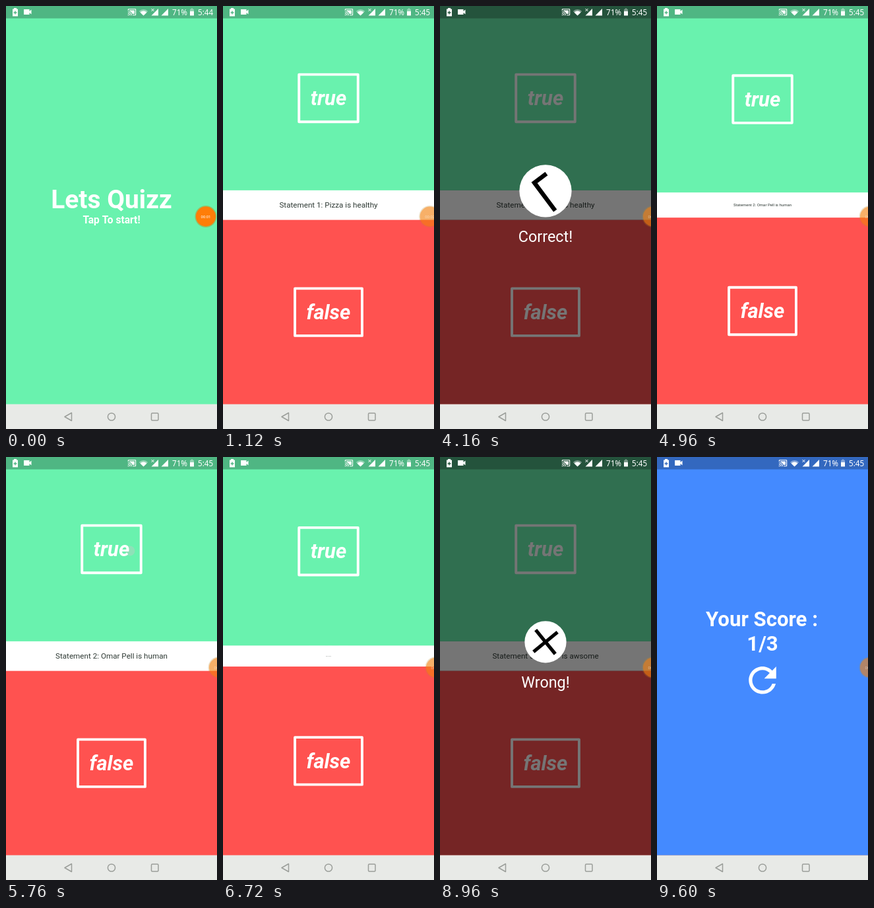
Animation, 320 px wide and 640 px high, one loop 9760 ms. Source, as an HTML page with a canvas:

```html
<!DOCTYPE html>
<html lang="en">
<head>
<meta charset="utf-8">
<title>Quiz</title>
<style>
html, body { margin: 0; width: 100%; height: 100%; overflow: hidden; }
canvas { display: block; width: 320px; height: 640px; }
</style>
</head>
<body>
<canvas id="stage" width="320" height="640"></canvas>
<script>
const ctx = document.getElementById('stage').getContext('2d');
const LOOP = 9760, W = 320, BODY = 602.6, MID = BODY / 2, DP = 320 / 411;
const GREEN = '#69f2ae', RED = '#ff5250', BLUE = '#448aff';
const QUIZ_START = 480, SCORE_START = 9190, PUSH = 300;

const questions = [
  { text: 'Statement 1: Pizza is healthy', start: QUIZ_START, tap: 3800, x: 192, y: 468, correct: true },
  { text: 'Statement 2: Omar Pell is human', start: 4830, tap: 5800, x: 188, y: 142, correct: false },
  { text: 'Statement 3: Flutter is awsome', start: 6680, tap: 7770, x: 192, y: 468, correct: false }
];

const icons = {
  clear: 'M19 6.41L17.59 5 12 10.59 6.41 5 5 6.41 10.59 12 5 17.59 6.41 19 12 13.41 17.59 19 19 17.59 13.41 12z',
  done: 'M9 16.2L4.8 12l-1.4 1.4L9 19 21 7l-1.4-1.4z',
  refresh: 'M17.65 6.35C16.2 4.9 14.21 4 12 4c-4.42 0-8 3.58-8 8s3.58 8 8 8c3.73 0 6.84-2.55 7.73-6h-2.08c-.82 2.33-3.04 4-5.65 4-3.31 0-6-2.69-6-6s2.69-6 6-6c1.66 0 3.14.69 4.22 1.78L13 11h7V4z',
  cast: 'M21 3H3c-1.1 0-2 .9-2 2v3h2V5h18v14h-7v2h7c1.1 0 2-.9 2-2V5c0-1.1-.9-2-2-2zM1 18v3h3c0-1.66-1.34-3-3-3zm0-4v2c2.76 0 5 2.24 5 5h2c0-3.87-3.13-7-7-7zm0-4v2c4.97 0 9 4.03 9 9h2c0-6.08-4.93-11-11-11zM19 7H5v1.63c3.96 1.28 7.09 4.41 8.37 8.37H19z'
};
for (const name in icons) icons[name] = new Path2D(icons[name]);

const clamp = v => Math.min(1, Math.max(0, v));

function bezier(x1, y1, x2, y2) {
  const at = (a, b, s) => 3 * a * s * (1 - s) ** 2 + 3 * b * s * s * (1 - s) + s ** 3;
  return x => {
    let lo = 0, hi = 1;
    for (let i = 0; i < 20; i++) {
      const s = (lo + hi) / 2;
      if (at(x1, x2, s) < x) lo = s; else hi = s;
    }
    return at(y1, y2, lo);
  };
}
const slideEase = bezier(.4, 0, .2, 1), fadeEase = bezier(.42, 0, 1, 1);

function bounceOut(t) {
  const hop = (shift, base) => 7.5625 * (t - shift / 2.75) ** 2 + base;
  if (t < 1 / 2.75) return hop(0, 0);
  if (t < 2 / 2.75) return hop(1.5, .75);
  if (t < 2.5 / 2.75) return hop(2.25, .9375);
  return hop(2.625, .984375);
}

const elasticOut = t =>
  t >= 1 ? 1 : 2 ** (-10 * t) * Math.sin((t - .1) * Math.PI * 5) + 1;

function rect(x, y, w, h, color) {
  ctx.fillStyle = color;
  ctx.fillRect(x, y, w, h);
}

function disc(x, y, r, color) {
  ctx.fillStyle = color;
  ctx.beginPath();
  ctx.arc(x, y, r, 0, 7);
  ctx.fill();
}

function poly(...p) {
  ctx.beginPath();
  for (let i = 0; i < p.length; i += 2) ctx.lineTo(p[i], p[i + 1]);
  ctx.closePath();
}

// Centres a line of text on (x, y) by its line box.
function label(text, x, y, size, color = '#fff', style = '') {
  ctx.font = `${style} ${size}px Roboto, sans-serif`;
  ctx.textAlign = 'center';
  ctx.fillStyle = color;
  ctx.fillText(text, x, y + size * .342);
}

function icon(name, x, y, size, color, angle = 0) {
  ctx.save();
  ctx.translate(x, y);
  ctx.rotate(angle);
  ctx.scale(size / 24, size / 24);
  ctx.translate(-12, -12);
  ctx.fillStyle = color;
  ctx.fill(icons[name]);
  ctx.restore();
}

function landing() {
  rect(0, 0, W, BODY, GREEN);
  label('Lets Quizz', 160, MID - 9.1, 50 * DP, '#fff', 'bold');
  label('Tap To start!', 160, MID + 22.8, 20 * DP, '#fff', 'bold');
}

function ripple(q, t, top, h) {
  const dt = t - q.tap;
  if (dt < -90 || dt > 200 || q.y < top || q.y > top + h) return;
  const r = dt < 0 ? (dt + 90) * .145 : 13 + dt * DP;
  ctx.save();
  ctx.beginPath();
  ctx.rect(0, top, W, h);
  ctx.clip();
  disc(q.x, q.y, r, `rgba(200,200,200,${.4 * (1 - Math.max(0, dt) / 200)})`);
  ctx.restore();
}

function answer(text, top, h, color, q, t) {
  rect(0, top, W, h, color);
  ripple(q, t, top, h);
  const size = 40 * DP, line = 5 * DP, cy = top + h / 2;
  label(text, 160, cy, size, '#fff', 'italic bold');
  const w = ctx.measureText(text).width + 40 * DP + line;
  const boxH = size * 1.172 + 40 * DP + line;
  ctx.strokeStyle = '#fff';
  ctx.lineWidth = line;
  ctx.strokeRect(160 - w / 2, cy - boxH / 2, w, boxH);
}

function verdict(q, t) {
  rect(0, 0, W, BODY, 'rgba(0,0,0,.54)');
  const v = elasticOut((t - q.tap) / 2000), size = 80 * DP * v;
  const font = 30 * DP, lineH = font * 1.172, total = size + 20 * DP + lineH;
  const cy = MID - total / 2 + size / 2;
  disc(160, cy, size / 2, '#fff');
  icon(q.correct ? 'done' : 'clear', 160, cy, size, '#000', v * 2 * Math.PI);
  label(q.correct ? 'Correct!' : 'Wrong!', 160, MID + total / 2 - lineH / 2, font);
}

function quiz(t) {
  const q = questions.filter(item => item.start <= t).pop();
  const v = bounceOut(clamp((t - q.start) / 500)), font = 15 * DP * v;
  const barH = 40 * DP + font * 1.172, half = (BODY - barH) / 2;
  answer('true', 0, half, GREEN, q, t);
  rect(0, half, W, barH, '#fff');
  if (font > .2) label(q.text, 160, MID, font, '#2f3a35');
  answer('false', half + barH, half, RED, q, t);
  if (t >= q.tap) verdict(q, t);
}

function score() {
  rect(0, 0, W, BODY, BLUE);
  label('Your Score :', 159, MID - 55.7, 40 * DP, '#fff', 'bold');
  label('1/3', 160, MID - 19.2, 40 * DP, '#fff', 'bold');
  icon('refresh', 160, MID + 36.5, 80 * DP, '#fff');
}

// A new page rises a quarter of the screen while it fades in.
function page(t, start, draw) {
  const p = clamp((t - start) / PUSH);
  ctx.save();
  ctx.globalAlpha = fadeEase(p);
  ctx.translate(0, (1 - slideEase(p)) * BODY / 4);
  draw(t);
  ctx.restore();
}

function statusBar(t) {
  const white = '#fff', dim = 'rgba(255,255,255,.4)';
  rect(0, 0, W, 18.7, 'rgba(0,0,0,.25)');

  ctx.fillStyle = white;
  ctx.beginPath();
  ctx.rect(10, 4.5, 8, 11);
  ctx.rect(12, 3, 4, 1.5);
  ctx.rect(13.3, 7.5, 1.4, 5);
  ctx.rect(11.5, 9.3, 1.8, 1.4);
  ctx.rect(14.7, 9.3, 1.8, 1.4);
  ctx.fill('evenodd');

  rect(27, 5, 8.5, 8, white);
  poly(34, 9, 38.5, 5.5, 38.5, 12.5);
  ctx.fill();
  icon('cast', 191, 9.3, 13.5, white);

  for (const [r, color] of [[9.5, dim], [7, white]]) {
    ctx.fillStyle = color;
    ctx.beginPath();
    ctx.moveTo(208.5, 14.6);
    ctx.arc(208.5, 14.6, r, -Math.PI * .75, -Math.PI / 4);
    ctx.fill();
  }
  for (const x of [231, 246]) {
    poly(x, 4, x, 14.5, x - 10.5, 14.5);
    ctx.fill();
  }
  ctx.strokeStyle = white;
  ctx.lineWidth = 1;
  ctx.beginPath();
  ctx.moveTo(220.5, 4);
  ctx.lineTo(224.5, 8);
  ctx.moveTo(224.5, 4);
  ctx.lineTo(220.5, 8);
  ctx.stroke();

  rect(280.5, 3.5, 3, 1.5, dim);
  rect(279, 5, 6, 3, dim);
  rect(279, 8, 6, 6.5, white);

  ctx.font = '11.7px "Noto Sans", sans-serif';
  ctx.textAlign = 'left';
  ctx.fillText('71%', 252, 13.8);
  ctx.fillText(t < QUIZ_START ? '5:44' : '5:45', 291, 13.8);
}

function navBar() {
  rect(0, BODY, W, 640 - BODY, '#e8eae7');
  ctx.strokeStyle = '#9b9e9a';
  ctx.lineWidth = 1.5;
  ctx.lineJoin = 'round';
  poly(89, 621.5, 99.5, 615.5, 99.5, 627.5);
  ctx.stroke();
  ctx.beginPath();
  ctx.arc(160, 621.5, 5.6, 0, 7);
  ctx.stroke();
  ctx.beginPath();
  ctx.roundRect(220.5, 616, 10.5, 11, 1.5);
  ctx.stroke();
}

// The floating timer fades and slides half off the edge.
function recorder(t) {
  const x = 303 + 20 * clamp((t - 800) / 600), y = 318.5;
  ctx.save();
  ctx.globalAlpha = 1 - .5 * clamp((t - 700) / 300);
  disc(x, y, 16.5, 'rgba(190,140,40,.5)');
  disc(x, y, 15, '#ff7d08');
  label('00:' + String(1 + Math.floor(t / 1000)).padStart(2, '0'), x, y, 6);
  ctx.restore();
}

function frame(now) {
  const t = now % LOOP;
  if (t < QUIZ_START + PUSH) landing();
  if (t >= QUIZ_START) page(t, QUIZ_START, quiz);
  if (t >= SCORE_START) page(t, SCORE_START, score);
  statusBar(t);
  navBar();
  recorder(t);
  requestAnimationFrame(frame);
}
frame(0);
</script>
</body>
</html>
```
